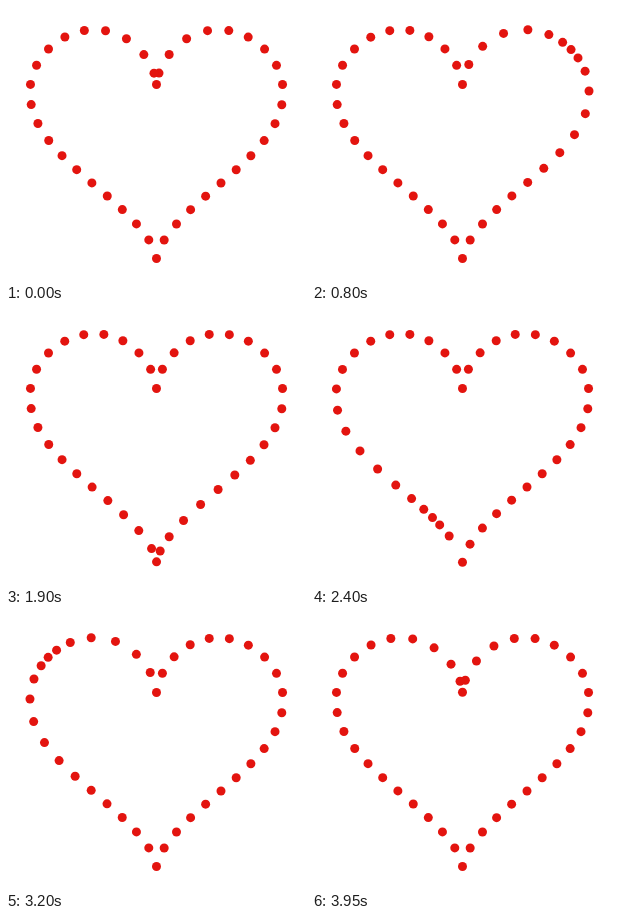
Recreate the animation shown at these times as an HTML page with a canvas. Size 300 px wide and 276 px high, loop 4000 ms.

```html
<!DOCTYPE html>
<html lang="en">
<head>
<meta charset="utf-8">
<title>Heart of dots</title>
<style>
  html, body { margin: 0; width: 300px; height: 276px; overflow: hidden; background: #fff; }
  canvas { display: block; }
</style>
</head>
<body>
<canvas id="stage" width="300" height="276"></canvas>
<script>
const ctx = document.getElementById('stage').getContext('2d');
const { sin, cos, exp, hypot, PI } = Math;
const TAU = 2 * PI, LOOP = 4000, DOTS = 40, RADIUS = 4.5, SCALE = 7.909;

const heart = a => [
  150.5 + SCALE * 16 * sin(a) ** 3,
  118 - SCALE * (13 * cos(a) - 5 * cos(2 * a) - 2 * cos(3 * a) - cos(4 * a))
];

// Angles that split the curve into pieces of equal length
function evenAngles(count, steps = 8000) {
  const lengths = [0];
  let [px, py] = heart(0);
  for (let i = 1; i <= steps; i++) {
    const [x, y] = heart(i / steps * TAU);
    lengths.push(lengths[i - 1] + hypot(x - px, y - py));
    [px, py] = [x, y];
  }
  return Array.from({ length: count }, (_, k) =>
    lengths.findIndex(l => l >= k / count * lengths[steps]) / steps * TAU);
}

const rest = evenAngles(DOTS);

// Nearby dots are drawn along the curve towards the travelling centre
function pull(angle, centre) {
  let d = angle - centre;
  d -= TAU * Math.round(d / TAU);
  return angle - 0.5 * d * exp(-5 * d * d);
}

function draw(now) {
  const centre = now % LOOP / LOOP * TAU;
  ctx.fillStyle = '#fff';
  ctx.fillRect(0, 0, 300, 276);
  ctx.fillStyle = '#e3140f';
  for (const angle of rest) {
    ctx.beginPath();
    ctx.arc(...heart(pull(angle, centre)), RADIUS, 0, TAU);
    ctx.fill();
  }
  requestAnimationFrame(draw);
}
requestAnimationFrame(draw);
</script>
</body>
</html>
```
